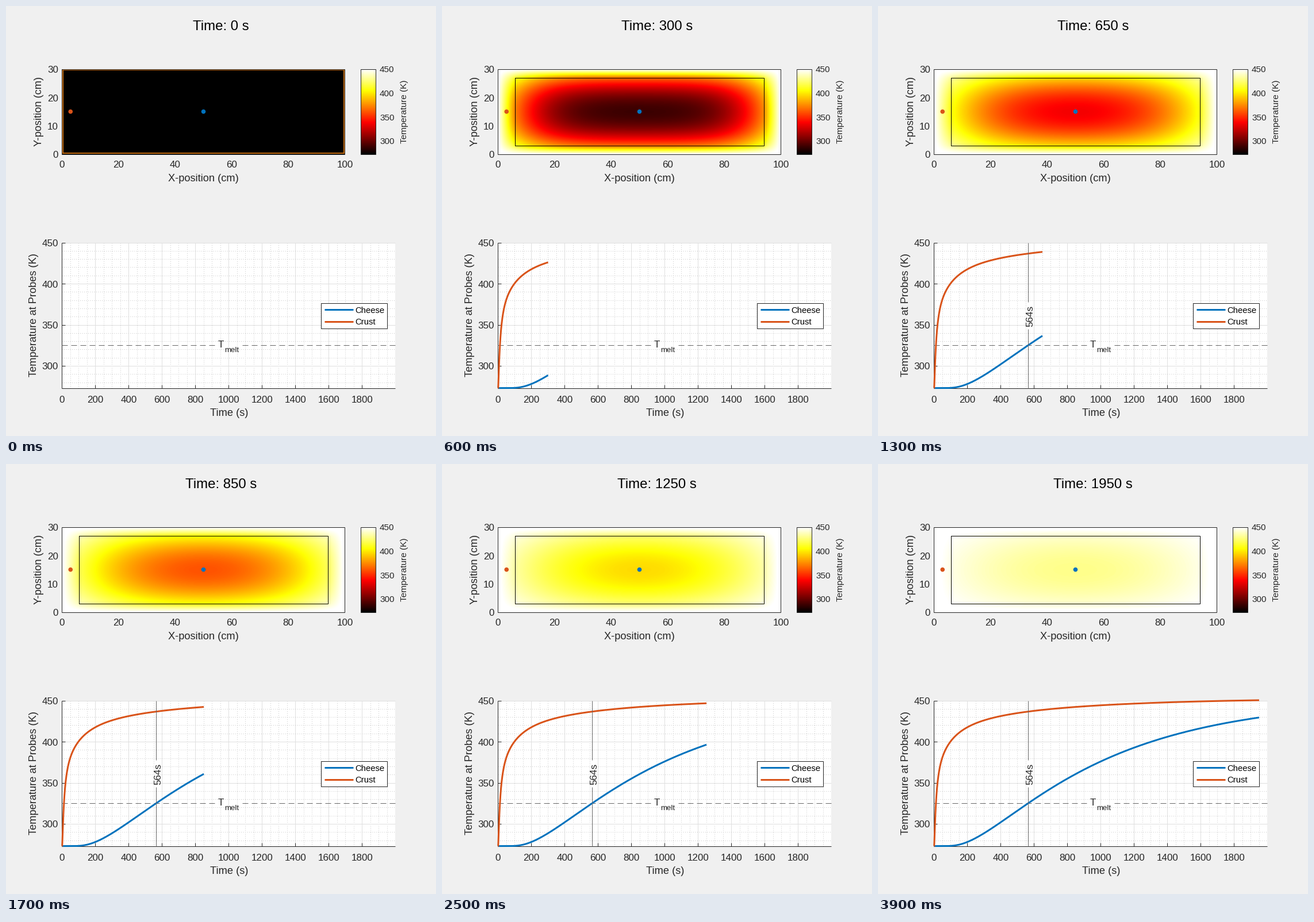
A matplotlib script for the animation above (4000 ms loop, 748x748 px).

```python
import numpy as np
import matplotlib.pyplot as plt
from matplotlib.animation import FuncAnimation
from matplotlib.colors import LinearSegmentedColormap
from matplotlib.patches import Circle, Rectangle

SIZE, DPI = 748, 64
FRAMES, INTERVAL, SECONDS_PER_FRAME = 40, 100, 50
T_COLD, T_TOP, T_OVEN = 273, 450, 453
T_MELT, MELT_TIME = 325, 564
DARK, REF = "#262626", "#676767"
BLUE, ORANGE = "#0072BD", "#D95319"

plt.rcParams["font.family"] = "Liberation Sans"
hot = LinearSegmentedColormap.from_list(
    "heat", [(0, "black"), (0.375, "red"), (0.75, "yellow"), (1, "white")], N=256)


def simulate(steps=3900, h=0.5, width=50, height=30, crust=3, crust_k=0.5):
    """Explicit heat conduction in a cheese slab framed by an insulating crust."""
    x = np.arange(0, width + h / 2, h)
    y = np.arange(0, height + h / 2, h)

    def conductivity(xs, ys):
        gx = np.minimum(xs, width - xs)[None, :]
        gy = np.minimum(ys, height - ys)[:, None]
        return np.where(np.minimum(gx, gy) < crust, crust_k, 1.0)

    kx = 0.24 * conductivity(x[:-1] + h / 2, y[1:-1])
    ky = 0.24 * conductivity(x[1:-1], y[:-1] + h / 2)

    temp = np.full((len(y), len(x)), float(T_OVEN))
    temp[1:-1, 1:-1] = T_COLD
    history = np.empty((steps, len(y), len(x)), dtype=np.float32)
    for n in range(steps):
        history[n] = temp
        flow_x = kx * np.diff(temp[1:-1], axis=1)
        flow_y = ky * np.diff(temp[:, 1:-1], axis=0)
        temp[1:-1, 1:-1] += np.diff(flow_x, axis=1) + np.diff(flow_y, axis=0)
    return history


history = simulate()
cheese = history[:, 30, 50]
crust = history[:, 2:4, 14].mean(axis=1)
# The length of a step follows from the melting time at the centre.
dt = MELT_TIME / np.interp(T_MELT, cheese, np.arange(len(cheese)))
times = np.arange(len(cheese)) * dt

fig = plt.figure(figsize=(SIZE / DPI, SIZE / DPI), dpi=DPI, facecolor="#f0f0f0")
ax = fig.add_axes([0, 0, 1, 1])
ax.axis("off")


def pt(pixels):
    return pixels * 72 / DPI


def pos_x(cm):
    return 97.5 + 4.92 * cm


def pos_y(cm):
    return 257.5 - 4.92 * cm


def time_x(t):
    return 97.5 + 0.29 * t


def temp_y(kelvin):
    return 411.5 + 1.43 * (T_TOP - kelvin)


def text(x, y, s, size, ha="center", color=DARK, rotation=0, z=8):
    return ax.text(x, y, s, fontsize=pt(size), ha=ha, va="baseline", color=color,
                   rotation=rotation, rotation_mode="anchor", zorder=z)


def line(xs, ys, color=DARK, width=1, z=4, **kw):
    kw.setdefault("solid_capstyle", "butt")
    return ax.plot(xs, ys, color=color, lw=pt(width), zorder=z, **kw)[0]


def box(x0, y0, x1, y1, face="none", edge="none", width=1, z=4):
    patch = Rectangle((x0, y0), x1 - x0, y1 - y0, facecolor=face, edgecolor=edge,
                      lw=pt(width) if edge != "none" else 0, zorder=z)
    return ax.add_patch(patch)


def heat_image(data, extent, z):
    return ax.imshow(data, cmap=hot, vmin=T_COLD, vmax=T_TOP, extent=extent,
                     aspect="auto", interpolation="bilinear", zorder=z)


title = text(374, 42, "", 24, color="black")

# Temperature map
left, right, top, bottom = pos_x(0), pos_x(100), pos_y(30), pos_y(0)
heat = heat_image(history[0], (pos_x(-0.5), pos_x(100.5), pos_y(-0.25), pos_y(30.25)), 2)
heat.set_clip_path(Rectangle((left, top), right - left, bottom - top,
                             transform=ax.transData))
rim = box(left + 1.5, top + 1.5, right - 1.5, bottom - 1.5, edge="#bf6a12", width=2, z=3)
box(pos_x(6), pos_y(27), pos_x(94), pos_y(3), edge="black", z=3)
box(left, top, right, bottom, edge=DARK)
for cm, color in ((3, ORANGE), (50, BLUE)):
    ax.add_patch(Circle((pos_x(cm), pos_y(15)), 3.8, facecolor=color, lw=0, zorder=5))
for cm in range(0, 101, 20):
    text(pos_x(cm), 281, str(cm), 17)
for cm in range(0, 31, 10):
    text(91, pos_y(cm) + 6.5, str(cm), 17, ha="right")
text(343.5, 305, "X-position (cm)", 18.2)
text(62, 183.5, "Y-position (cm)", 18.2, rotation=90)

# Colour bar
ramp = np.linspace(T_TOP, T_COLD, 256)[:, None]
heat_image(ramp, (617.5, 643.5, bottom, top), 2)
box(617.5, top, 643.5, bottom, edge=DARK)
for kelvin in range(300, 451, 50):
    y = bottom + (top - bottom) * (kelvin - T_COLD) / (T_TOP - T_COLD)
    text(650, y + 5.5, str(kelvin), 15.3, ha="left")
text(697, 184, "Temperature (K)", 15.3, rotation=90)

# Probe chart
x0, x1, y0, y1 = time_x(0), 677, temp_y(T_COLD), temp_y(T_TOP)
box(x0, y1, x1, y0, face="white", z=1)
dots = dict(color="#c6c6c6", linestyle=(0, (1, 2.5)), z=2)
for t in range(50, 2000, 50):
    if t % 200:
        line([time_x(t)] * 2, [y0, y1], **dots)
    else:
        line([time_x(t)] * 2, [y0, y1], "#dfdfdf", z=2)
        line([time_x(t)] * 2, [y0, y0 - 5.5])
for kelvin in range(280, 451, 10):
    y = temp_y(kelvin)
    if kelvin % 50:
        line([x0, x1], [y, y], **dots)
    else:
        line([x0, x1], [y, y], "#dfdfdf", z=2)
        line([x0, x0 + 5.5], [y, y])
        text(91, y + 6.5, str(kelvin), 17, ha="right")
for t in range(0, 1801, 200):
    text(time_x(t), 690, str(t), 17)
line([x0, x0], [y1, y0])
line([x0, x1], [y0, y0])
text(388, 713, "Time (s)", 18.2)
text(53, 537.5, "Temperature at Probes (K)", 18.2, rotation=90)

# Melting temperature and time
dash = dict(color=REF, linestyle=(0, (10, 6)), z=4)
line([x0, 363], [temp_y(T_MELT)] * 2, **dash)
line([411, x1], [temp_y(T_MELT)] * 2, **dash)
text(369, 594, "T", 17, ha="left")
text(380, 602, "melt", 13.2, ha="left")
melt_x = time_x(MELT_TIME)
melt_marks = [
    line([melt_x] * 2, [y1, 515], REF, z=6),
    line([melt_x] * 2, [562, y0], REF, z=6),
    text(269, 539, f"{MELT_TIME}s", 17, rotation=90),
]

cheese_line = line([], [], BLUE, 3, z=5)
crust_line = line([], [], ORANGE, 3, z=5)

# Legend
box(548.5, 516.5, 663.5, 560.5, face="white", edge=DARK, z=7)
for y, color, name in ((528, BLUE, "Cheese"), (548.5, ORANGE, "Crust")):
    line([554, 604], [y, y], color, 3, z=8)
    text(607.5, y + 5.5, name, 14.9, ha="left", color="black")

ax.set_xlim(0, SIZE)
ax.set_ylim(SIZE, 0)


def update(frame):
    now = frame * SECONDS_PER_FRAME
    n = min(round(now / dt), len(times) - 1)
    title.set_text(f"Time: {now} s")
    heat.set_data(history[n] if frame else np.full_like(history[0], T_COLD))
    rim.set_visible(frame == 0)
    for curve, values in ((cheese_line, cheese), (crust_line, crust)):
        curve.set_data(time_x(times[:n + 1]), temp_y(values[:n + 1]))
    for mark in melt_marks:
        mark.set_visible(now >= MELT_TIME)
    return [title, heat, rim, cheese_line, crust_line, *melt_marks]


anim = FuncAnimation(fig, update, frames=FRAMES, interval=INTERVAL,
                     repeat=True, repeat_delay=0, blit=False)
plt.show()
```
